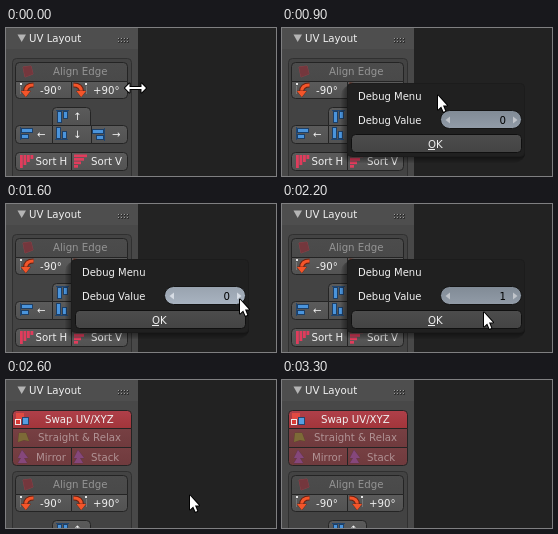
Recreate the animation shown at these times as an HTML page with a canvas. Size 270 px wide and 148 px high, loop 3.8 s.

```html
<!DOCTYPE html>
<html lang="en">
<head>
<meta charset="utf-8">
<title>UV Layout panel</title>
<style>
html, body { margin: 0; width: 100%; height: 100%; overflow: hidden; background: #222; }
canvas { display: block; }
</style>
</head>
<body>
<canvas id="stage" width="270" height="148"></canvas>
<script>
const ctx = document.getElementById('stage').getContext('2d');
const LOOP = 3800, STEP = 100;
const FONT = '10.2px "DejaVu Sans", sans-serif';
const EDGE = '#242424', PINK = '#e03c5c', BLUE = '#4a94dc', WHITE = '#f0f0f0';

function rect(x, y, w, h, color) {
  ctx.fillStyle = color;
  ctx.fillRect(x, y, w, h);
}

function poly(points, fill, stroke, width = 1) {
  ctx.beginPath();
  points.forEach(([x, y]) => ctx.lineTo(x, y));
  ctx.closePath();
  if (stroke) {
    ctx.strokeStyle = stroke;
    ctx.lineWidth = width;
    ctx.stroke();
  }
  ctx.fillStyle = fill;
  ctx.fill();
}

function text(str, x, y, color = WHITE, font = FONT) {
  ctx.font = font;
  ctx.fillStyle = color;
  ctx.fillText(str, x, y);
}

function shade(y, h, top, bottom) {
  const g = ctx.createLinearGradient(0, y, 0, y + h);
  g.addColorStop(0, top);
  g.addColorStop(1, bottom);
  return g;
}

// Rounded box given by its outer left, top, right and bottom
function box(l, t, r, b, radius, fill, edge = EDGE) {
  ctx.beginPath();
  ctx.roundRect(l + 0.5, t + 0.5, r - l - 1, b - t - 1, radius);
  ctx.fillStyle = fill;
  ctx.fill();
  ctx.strokeStyle = edge;
  ctx.lineWidth = 1;
  ctx.stroke();
}

function button(l, t, r, b, radius, top = '#5b5b5b', bottom = '#525252') {
  box(l, t, r, b, radius, shade(t, b - t, top, bottom));
}

function header() {
  rect(0, 0, 132, 21, '#4e4e4e');
  poly([[11.5, 6.5], [20, 6.5], [15.7, 14]], '#b4b4b4');
  text('UV Layout', 23, 14);
  for (let i = 0; i < 4; i++) {
    for (const y of [10, 13]) {
      rect(112 + i * 3, y, 2, 2, '#303030');
      rect(112 + i * 3, y, 1, 1, '#9c9c9c');
    }
  }
}

function turnIcon(cx, cy, dir) {
  ctx.save();
  ctx.translate(cx, cy);
  ctx.scale(dir, 1);
  rect(-7, -7, 2, 2, '#e8e8e8');
  rect(-7, -4, 1, 8, '#777');
  for (const [color, width] of [['#6b2010', 5], ['#f4552a', 3.2]]) {
    ctx.beginPath();
    ctx.moveTo(6.5, -5);
    ctx.quadraticCurveTo(-1.5, -5, -1.5, 2);
    ctx.strokeStyle = color;
    ctx.lineWidth = width;
    ctx.stroke();
  }
  poly([[-6, 1], [3.5, 1], [-1.2, 7]], '#f4552a', '#6b2010', 0.8);
  ctx.restore();
}

// A guide line with two bars hanging from it; long and short name the bar lengths
function alignIcon(cx, cy, turns, long, short) {
  ctx.save();
  ctx.translate(cx, cy);
  ctx.rotate(turns * Math.PI / 2);
  rect(-6, -6, 13, 1, '#22466f');
  for (const [x, h] of [[-5, long], [1, short]]) {
    rect(x, -5, 5, h, '#1d3f66');
    rect(x + 1, -4, 3, h - 2, BLUE);
  }
  ctx.restore();
}

function sortIcon(cx, cy, vertical) {
  for (let i = 0; i < 4; i++) {
    const len = 13 - i * 3;
    const at = -7 + i * 3.5;
    if (vertical) rect(cx - 7, cy + at + 0.5, len, 2.7, PINK);
    else rect(cx + at, cy - 6, 2.8, len, PINK);
  }
}

function tools(dy) {
  ctx.save();
  ctx.translate(0, dy);
  box(6, 30, 126, 170, 4, '#434343', '#303030');

  button(9, 34, 122, 54, [4, 4, 0, 0], '#4c4c4c', '#494949');
  poly([[17, 39], [25, 38], [27, 46], [19, 49]], '#74373d', '#8a4148');
  text('Align Edge', 47, 47, '#949494');

  button(9, 53, 66, 71, [0, 0, 0, 4]);
  button(65, 53, 122, 71, [0, 0, 4, 0]);
  turnIcon(21, 62, 1);
  turnIcon(74, 62, -1);
  text('-90°', 34, 66);
  text('+90°', 87, 66);

  button(46, 79, 85, 98, [4, 4, 0, 0]);
  button(9, 97, 47, 116, [4, 0, 0, 4]);
  button(46, 97, 86, 116, 0);
  button(85, 97, 122, 116, [0, 4, 4, 0]);
  alignIcon(56, 88, 0, 12, 8);
  alignIcon(20, 106, 3, 8, 12);
  alignIcon(56, 106, 2, 8, 12);
  alignIcon(93, 106, 1, 12, 8);
  text('↑', 67, 92);
  text('←', 31, 110);
  text('↓', 67, 110);
  text('→', 106, 110);

  button(9, 124, 66, 143, [4, 0, 0, 4]);
  button(65, 124, 122, 143, [0, 4, 4, 0]);
  sortIcon(21, 133, false);
  sortIcon(75, 133, true);
  text('Sort H', 29.5, 137);
  text('Sort V', 85, 137);
  ctx.restore();
}

function spikeIcon(cx, cy) {
  poly([[cx - 1, cy - 7], [cx + 5, cy + 1], [cx + 1, cy + 1], [cx + 4, cy + 6],
        [cx - 5, cy + 6], [cx - 2, cy + 1], [cx - 5, cy + 1]], '#85477b', '#63354f');
}

function redTools() {
  const dim = ['#774043', '#6f3a3d'], faint = '#b09294';
  button(6, 48, 126, 68, 0, ...dim);
  button(6, 67, 66, 86, [0, 0, 0, 4], ...dim);
  button(65, 67, 126, 86, [0, 0, 4, 0], ...dim);
  button(6, 30, 126, 49, [4, 4, 0, 0], '#b0404a', '#a1353a');

  rect(10, 33, 8, 6, '#e04a42');
  rect(9, 39, 6, 6, '#efe9e9');
  rect(10, 40, 4, 4, '#d83b35');
  rect(16, 37, 7, 8, '#25456f');
  rect(17, 38, 5, 6, '#569ee0');
  text('Swap UV/XYZ', 39, 43);

  poly([[13, 53], [20, 53], [23, 61], [18, 60], [12, 62]], '#7d6a37', '#62472f');
  text('Straight & Relax', 32, 61, faint);
  spikeIcon(17, 77);
  text('Mirror', 30, 81, faint);
  spikeIcon(73, 77);
  text('Stack', 85, 81, faint);
}

function popup(value, hover, pressed) {
  for (let i = 6; i > 0; i--) {
    ctx.beginPath();
    ctx.roundRect(65 - i, 57, 178 + i, 72 + i, 4 + i);
    ctx.fillStyle = 'rgba(0,0,0,0.08)';
    ctx.fill();
  }
  box(65, 55, 243, 129, 4, '#202020', '#1c1c1c');
  const font = '10px "DejaVu Sans", sans-serif';
  text('Debug Menu', 76, 72, WHITE, font);
  text('Debug Value', 76, 96, WHITE, font);

  const [top, bottom] = hover ? ['#98a2ae', '#a9b4c1'] : ['#808a95', '#929ca8'];
  box(158, 82, 240, 101, 9, shade(82, 19, top, bottom), '#141414');
  const arrow = hover ? '#d6dce4' : '#c0c4ca';
  poly([[168, 88.5], [168, 95.5], [163.5, 92]], arrow);
  poly([[231, 88.5], [231, 95.5], [235.5, 92]], arrow);
  text(value, 217.5, 96, '#000');

  const fill = pressed ? shade(107, 17, '#ef981b', '#f8a324') : shade(107, 17, '#4c4c4c', '#444');
  box(69, 106, 240, 125, 4, fill, '#101010');
  const ink = pressed ? '#000' : WHITE;
  text('OK', 146, 120, ink);
  rect(146, 121, 7, 1, ink);
}

function outlined(x, y, points) {
  ctx.lineJoin = 'round';
  poly(points.map(([px, py]) => [x + px, y + py]), '#fff', '#000', 2);
  ctx.lineJoin = 'miter';
}

function pointer(x, y) {
  outlined(x, y, [[1, 1.6], [1, 15.4], [4.2, 12.4], [6.5, 17.8], [8.3, 17], [6, 11.6], [10, 11.4]]);
}

function resizeCursor(x, y) {
  outlined(x, y, [
    [-10.5, 0], [-6, -4.5], [-6, -1],
    [6, -1], [6, -4.5], [10.5, 0], [6, 4.5], [6, 1],
    [-6, 1], [-6, 4.5]
  ]);
}

// Moves of the pointer: start, end, from, to, easing
const ease = k => k * k * (3 - 2 * k);
const moves = [
  [0, 400, [129.5, 60], [155, 66], ease],
  [1200, 1600, [155, 66], [233, 94], ease],
  [1900, 2400, [233, 94], [183, 114], ease],
  [2800, 3300, [183, 114], [48, 152], k => k]
];

function pointerAt(t) {
  const [start, end, a, b, curve] = moves.filter(m => m[0] <= t).pop();
  const k = curve(Math.min(1, (t - start) / (end - start)));
  return a.map((v, i) => v + (b[i] - v) * k);
}

function draw(t) {
  const [x, y] = pointerAt(t);
  rect(0, 0, 270, 148, '#222');
  rect(0, 0, 132, 148, '#484848');
  header();
  const done = t >= 2600;
  tools(done ? 61 : 0);
  if (done) redTools();
  if (t >= 900 && !done) {
    const hover = x >= 158 && x <= 240 && y >= 82 && y <= 101;
    popup(t < 1900 ? '0' : '1', hover, t >= 2500);
  }
  if (t < 100) resizeCursor(x, y);
  else if (t < 3300) pointer(Math.round(x), Math.round(y));
}

const begin = performance.now();
function tick() {
  const t = (performance.now() - begin) % LOOP;
  draw(Math.floor(t / STEP) * STEP);
  requestAnimationFrame(tick);
}
tick();
</script>
</body>
</html>
```
